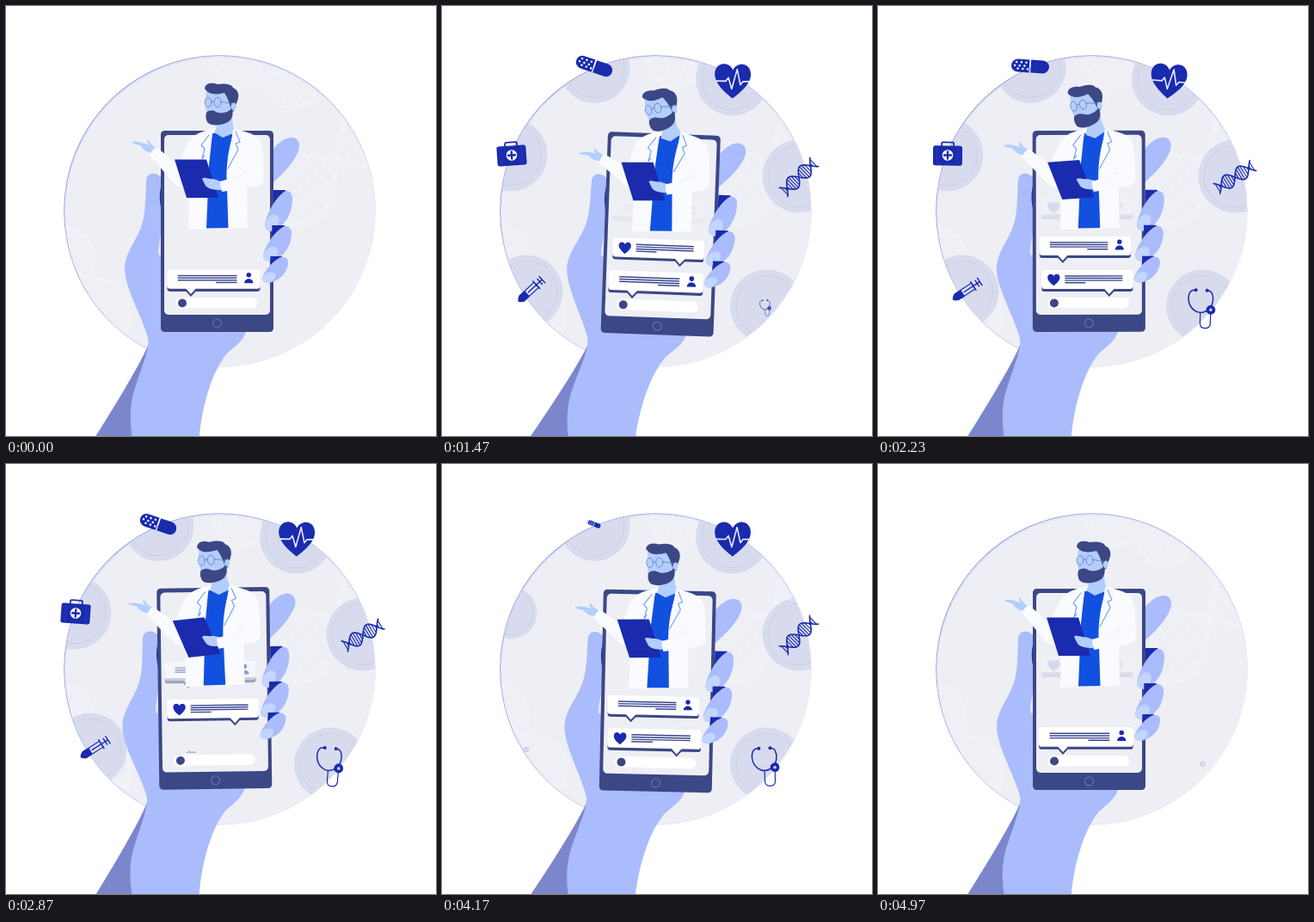
Animation, 500 px wide and 500 px high, one loop 5.01 s. Source, as an HTML page with a canvas:

```html
<!DOCTYPE html>
<html lang="en">
<head>
<meta charset="utf-8">
<title>Online doctor</title>
<style>
html, body { margin: 0; width: 100%; height: 100%; overflow: hidden; background: #fff; }
canvas { display: block; width: 500px; height: 500px; }
</style>
</head>
<body>
<canvas id="stage"></canvas>
<script>
const LOOP = 5010, TAU = Math.PI * 2;
const canvas = document.getElementById('stage');
const dpr = window.devicePixelRatio || 1;
canvas.width = canvas.height = 500 * dpr;
const c = canvas.getContext('2d');

const NAVY = '#3c4785', BLUE = '#1a2bae', SKIN = '#aabcfb', NAIL = '#c3d5fd',
      FACE = '#b3cefc', COAT = '#fafbff', PALE = '#eeeff5';

const clamp = x => Math.max(0, Math.min(1, x));
const ease = x => (1 - Math.cos(Math.PI * clamp(x))) / 2;
const backOut = x => { const u = clamp(x) - 1; return 1 + 2 * u * u * u + u * u; };

// Eased interpolation between [time, value] pairs
function track(keys, t) {
  for (let i = 1; i < keys.length; i++) {
    const [t0, a] = keys[i - 1], [t1, b] = keys[i];
    if (t <= t1) return a + (b - a) * ease((t - t0) / (t1 - t0));
  }
  return keys[keys.length - 1][1];
}

const SWAY = [[0, 0], [1450, .0365], [2680, -.0165], [3800, .028], [LOOP, 0]];
const HEAD = [[0, 0], [1100, -.25], [1700, -.25], [3300, -.03], [4170, -.05], [LOOP, 0]];
const WAVE = [[0, 0], [1250, -.215], [1470, -.21], [2350, -.05], [2870, -.06], [4000, -.15], [LOOP, 0]];
const BOARD = [[0, 0], [770, -.07], [1470, -.037], [2870, -.095], [4170, -.03], [LOOP, 0]];

const swing = (t, mid, amp, peak) => mid + amp * Math.cos(TAU * (t - peak) / 2800);

function fill(d, color) { c.fillStyle = color; c.fill(new Path2D(d)); }
function line(d, color, w) { c.strokeStyle = color; c.lineWidth = w; c.stroke(new Path2D(d)); }
function ellipse(x, y, rx, ry, color, rot = 0) {
  c.beginPath(); c.ellipse(x, y, rx, ry, rot, 0, TAU);
  c.fillStyle = color; c.fill();
}
const dot = (x, y, r, color) => ellipse(x, y, r, r, color);
function ring(x, y, rx, ry, color, w) {
  c.beginPath(); c.ellipse(x, y, rx, ry, 0, 0, TAU);
  c.strokeStyle = color; c.lineWidth = w; c.stroke();
}
function box(x, y, w, h, r, color) {
  c.beginPath(); c.roundRect(x, y, w, h, r);
  c.fillStyle = color; c.fill();
}
function group(x, y, rot, scale, draw) {
  c.save();
  c.translate(x, y); c.rotate(rot); c.scale(scale, scale);
  draw();
  c.restore();
}
function turn(x, y, rot, draw) {
  group(x, y, rot, 1, () => { c.translate(-x, -y); draw(); });
}

function strands(len, amp, turns, color, w) {
  const wave = (x, s) => s * amp * Math.sin(x / len * TAU * turns);
  c.strokeStyle = color; c.lineWidth = w;
  for (const s of [-1, 1]) {
    c.beginPath();
    for (let x = -len / 2; x <= len / 2; x += len / 60) c.lineTo(x, wave(x, s));
    c.stroke();
  }
  c.lineWidth = w * .7;
  c.beginPath();
  for (let i = -8; i <= 8; i++) {
    const x = i * len / 17;
    c.moveTo(x, wave(x, -1)); c.lineTo(x, wave(x, 1));
  }
  c.stroke();
}

const HEART = 'M0 20 C-9 13 -21 3 -21 -8 C-21 -22 -5 -24 0 -13 C5 -24 21 -22 21 -8 C21 3 9 13 0 20Z';

function syringe() {
  c.scale(.9, .9);
  line('M-3 0 H17 M17 -4.5 V4.5 M11 -6.5 V6.5 M17 0 H21 M21 -5.5 V5.5', BLUE, 1.6);
  line('M-6 -4.5 H11 V4.5 H-6Z', BLUE, 1.3);
  fill('M-6 -5.2 H-15 L-19 -2.6 L-21 0 L-19 2.6 L-15 5.2 H-6Z', BLUE);
}
function kit() {
  line('M-7 -11 V-13.5 Q-7 -15 -5.5 -15 H5.5 Q7 -15 7 -13.5 V-11', BLUE, 1.8);
  box(-17, -11, 34, 23, 2.5, BLUE);
  line('M-12 -11 V12 M12 -11 V12', '#2d3dbb', .8);
  dot(0, 0, 6.3, '#fff');
  line('M-4 0 H4 M0 -4 V4', BLUE, 2.4);
}
function pill() {
  box(-22, -7.5, 21, 15, [7.5, 0, 0, 7.5], BLUE);
  box(.7, -7.5, 21.3, 15, [0, 7.5, 7.5, 0], BLUE);
  for (let i = 0; i < 9; i++) dot(-18 + i * 1.9, [0, -4, 3.5][i % 3], 1.25, '#fff');
}
function heart() {
  fill(HEART, BLUE);
  line('M-19 0 H-8 L-5 -4 L-1 9 L5 -14 L9 4 L12 0 H19', '#e8ebff', 1.6);
}
function helix() { strands(50, 8.3, 1.32, BLUE, 1.6); }
function stethoscope() {
  line('M-8 -20 C-15 -20 -16 -13 -15 -7 C-13 2 -6 6 -1 6 C6 6 12 0 13 -7 C14 -14 12 -20 6 -20', BLUE, 1.5);
  dot(-7, -20, 2, BLUE); dot(6, -20, 2, BLUE);
  line('M-1 6 V18 Q-1 24 5 24 Q11 24 11 18 V6', BLUE, 1.2);
  dot(11, 2.5, 5.4, BLUE); dot(11, 2.5, 1.8, '#c9d1f7');
}

// Disc centre and radius, icon centre, start of entry, end of exit, tilt
const BADGES = [
  { x: 98, y: 332, r: 42.5, ix: 102.5, iy: 331, start: 10, end: 4190, draw: syringe, tilt: t => swing(t, -.66, -.11, 1200) },
  { x: 80, y: 173, r: 42.5, ix: 81, iy: 173.5, start: 190, end: 4350, draw: kit, tilt: t => -.07 * Math.sin(TAU * (t - 770) / 2800) },
  { x: 177.5, y: 72, r: 41, ix: 177, iy: 70, start: 412, end: 4510, draw: pill, tilt: t => swing(t, .33, .27, 770) },
  { x: 337.5, y: 85, r: 42.5, ix: 338, iy: 87.5, start: 645, end: 4670, draw: heart, tilt: t => swing(t, .02, -.06, 770) },
  { x: 415, y: 198, r: 42.5, ix: 415, iy: 199, start: 880, end: 4830, draw: helix, tilt: t => swing(t, -.66, -.14, 1200) },
  { x: 377.5, y: 349, r: 42.5, ix: 376, iy: 350.5, start: 1110, end: 4990, draw: stethoscope, tilt: t => swing(t, .03, -.06, 1500) }
];
const STEP = 250;

function backdrop(t) {
  const edge = c.createLinearGradient(110, 110, 370, 360);
  edge.addColorStop(0, '#7d89de');
  edge.addColorStop(.6, '#b9c0ee');
  edge.addColorStop(1, PALE);
  dot(248.5, 238.5, 181.3, edge);
  dot(248.5, 238.5, 180.5, '#e4e6f3');
  c.save();
  c.beginPath(); c.arc(248.5, 238.5, 180.5, 0, TAU); c.clip();
  dot(249.5, 240.5, 180.5, PALE);

  const faint = 'rgba(255,255,255,.11)';
  group(385, 180, -.6, 1, () => strands(230, 42, 1, faint, 7));
  group(300, 85, .35, 1, () => strands(130, 22, 1, faint, 5));
  group(98, 315, .95, 1, () => strands(150, 22, 1, faint, 5));

  for (const b of BADGES) {
    const s = Math.min(clamp((t - b.start) / STEP), clamp((b.end - t) / STEP));
    if (!s) continue;
    dot(b.x, b.y, b.r * s, '#d8dbed');
    ring(b.x, b.y, b.r * .84 * s, b.r * .84 * s, '#cacfe7', 1);
  }
  c.restore();

  for (const b of BADGES) {
    const s = Math.min(ease((t - b.start - STEP) / STEP), clamp((b.end - STEP - t) / STEP));
    if (s > 0) group(b.ix, b.iy, b.tilt(t), s, b.draw);
  }
}

function hand() {
  fill('M166 392 C160 410 124 470 96 513 H150 L158 450Z', '#7b86cd');
  fill('M181 200 C176 193 164 192 163 203 C162 225 163 245 155 262 C146 281 138 290 138 306 ' +
       'C139 330 158 360 165 386 C168 400 153 430 147 455 C143 474 145 490 148 512 ' +
       'H224 C226 470 239 425 257 404 C269 393 276 390 280 376 L300 300 L190 190Z', SKIN);
  fill('M181 255 C180 272 176 280 177 289 L181 291Z', '#dbe4fe');
  fill('M181 207 C178 216 178 228 181 238Z', BLUE);
  fill('M308 170 C317 157 326 152 334 153 C342 155 343 164 338 173 C331 187 321 195 308 208Z', SKIN);
}

function phone() {
  box(180, 145, 131, 234, 4.5, NAVY);
  box(184, 150, 123, 209, 5, PALE);
  ring(245.5, 369, 5, 5, '#6e79b8', 1);
  box(197, 339, 95, 12.5, 6.2, '#fff');
  dot(205, 345.5, 5, NAVY);
}

function rows(x, y, w, shortX) {
  c.fillStyle = '#38448f';
  for (let i = 0; i < 3; i++) c.fillRect(x, y + i * 2.6, w, 1.4);
  c.fillRect(shortX, y + 7.8, 24, 1.4);
}
function balloon(x, tail) {
  const point = (y, color) => fill(`M${tail - 6} ${y} L${tail} ${y + 6.5} L${tail + 6} ${y}Z`, color);
  box(x, 326, 106, 6, [0, 0, 3, 3], NAVY);
  point(331.5, NAVY);
  box(x, 307, 106, 22, 3, '#fff');
  point(328.5, '#fff');
}
function personNote() {
  balloon(188, 215);
  rows(200, 313.3, 67.5, 243.5);
  dot(281, 313.3, 2.7, BLUE);
  fill('M276 322.5 C276 316 286 316 286 322.5Z', BLUE);
}
function heartNote() {
  balloon(190.5, 269);
  group(204.5, 318.5, 0, .34, () => fill(HEART, BLUE));
  rows(217.5, 313.3, 67, 217.5);
}

const NOTES = [
  { draw: personNote, tail: 215, pop: -330, up: 200, out: 900 },
  { draw: heartNote, tail: 269, pop: 360, up: 900, out: 1700 },
  { draw: personNote, tail: 215, pop: 1200, up: 1700, out: 2550 },
  { draw: heartNote, tail: 269, pop: 1800, up: 2550, out: 3550 },
  { draw: personNote, tail: 215, pop: 2860, up: 3550, out: 4380 },
  { draw: heartNote, tail: 269, pop: 3850, up: 4380, out: 4440 },
  { draw: personNote, tail: 215, pop: 4680, up: 5210, out: 5910 }
];
const MOVE = 440;

function chat(t) {
  for (const n of NOTES) {
    const size = t < n.pop ? 0 : backOut((t - n.pop) / 400);
    const alpha = 1 - clamp((t - n.out) / 600);
    if (size <= 0 || alpha <= 0) continue;
    const rise = 39 * ease((t - n.up) / MOVE) + 45 * ease((t - n.out) / MOVE);
    c.globalAlpha = alpha;
    group(n.tail, 337 - rise, 0, size, () => { c.translate(-n.tail, -337); n.draw(); });
    c.globalAlpha = 1;
  }
}

function head() {
  fill('M245 128 L264 122 C262 134 264 141 267 147 L252 153 L242 147 C245 142 246 136 245 128Z', FACE);
  fill('M233 99 H262 L264 127 C258 136 241 138 235 132 C232 124 231 112 233 99Z', FACE);
  fill('M231 96 C232 89 240 89 246 91 C252 90 262 90 264 95 C269 97 271 102 270 107 ' +
       'C269 112 267 114 266 121 L262 124 C261 115 258 107 254 101 C246 103 236 104 231 96Z', NAVY);
  ellipse(264.5, 117, 3, 4.5, FACE, .2);
  fill('M233 124 C236 121 241 121 244 123 C250 126 258 124 263 119 C265 129 261 134 256 136 ' +
       'C249 139 238 140 234 135 C232 131 232 127 233 124Z', NAVY);
  ring(235, 112, 3.8, 5.6, '#6b86c9', .9);
  ring(246, 112, 4, 5.6, '#6b86c9', .9);
  line('M239 111 H242 M250 111 L263 114', '#6b86c9', .9);
}

function doctor(t) {
  turn(210, 160, track(WAVE, t), () => {
    fill('M175 165 C170 163 167 159 165 155 C163 157 165 160 166 162 C160 159 153 157 146 158 ' +
         'C149 161 154 161 157 163 C160 168 164 170 169 171Z', FACE);
    fill('M175 164 L199 184 L214 155 L228 195 L209 211 Q201 212 194 205 L167 173 Q170 167 175 164Z', COAT);
  });
  fill('M243 142 C232 145 222 147 217 153 C211 162 213 180 213 200 L212 260 L281 258 ' +
       'L280 212 L298 200 C301 182 299 164 294 154 C288 148 276 146 265 142Z', COAT);
  fill('M278 186 C279 195 272 203 262 206 L281 211 V197Z', '#f0f4fd');
  fill('M240 148 L265 146 C259 165 255 185 257 212 L258.5 258 L233 258.5 L236 185Z', '#1251df');
  turn(256, 150, track(HEAD, t), head);

  fill('M241 145 L229 152 L226 163 L230 166 L227 179 L237 162Z', COAT);
  line('M236 150 L227 162 L231 166 L228 178 L231 174', '#6f9cf2', 1.1);
  fill('M264 143 L270 148 L273 158 L268 162 L270 166 L258 190 L261 165Z', COAT);
  line('M267 146 L272 158 L267 160 L270 167 L258 189', '#6f9cf2', 1.1);

  turn(242, 160, track(BOARD, t), () => {
    fill('M196 178.5 H233 L247 223 H210Z', BLUE);
    fill('M228 201 C231 198 236 202 241 201 L250 204 L250 214 C243 214 235 213 232 209Z', FACE);
  });
  fill('M299 180 L300 200 C300 207 295 209 288 210 L251 216 Q249 210 249 204 L283 194Z', COAT);
  line('M280 194 L264 200', '#edf1fb', 1);
}

// Fingertip drawn in a 32 x 48 box, fitted to the given box
function finger(x, y, w, h) {
  c.save();
  c.translate(x, y);
  c.scale(w / 32, h / 48);
  fill('M10 0 H24 L26 8 L10 26Z', BLUE);
  fill('M21 3 C27 -2 33 3 32 13 C31 27 25 38 16 44 C9 50 0 49 0 40 C2 28 11 11 21 3Z', SKIN);
  ellipse(8.5, 38, 7.2, 10.5, NAIL, .55);
  c.restore();
}

function draw(t) {
  c.setTransform(dpr, 0, 0, dpr, 0, 0);
  c.fillStyle = '#fff';
  c.fillRect(0, 0, 500, 500);
  c.lineCap = c.lineJoin = 'round';
  backdrop(t);
  turn(158, 503, track(SWAY, t), () => {
    hand();
    phone();
    chat(t);
    doctor(t);
    finger(301, 214, 32, 48);
    finger(299, 255, 33, 42);
    finger(298, 291, 30, 31);
  });
}

const begin = performance.now();
function tick() {
  draw((performance.now() - begin) % LOOP);
  requestAnimationFrame(tick);
}
tick();
</script>
</body>
</html>
```
